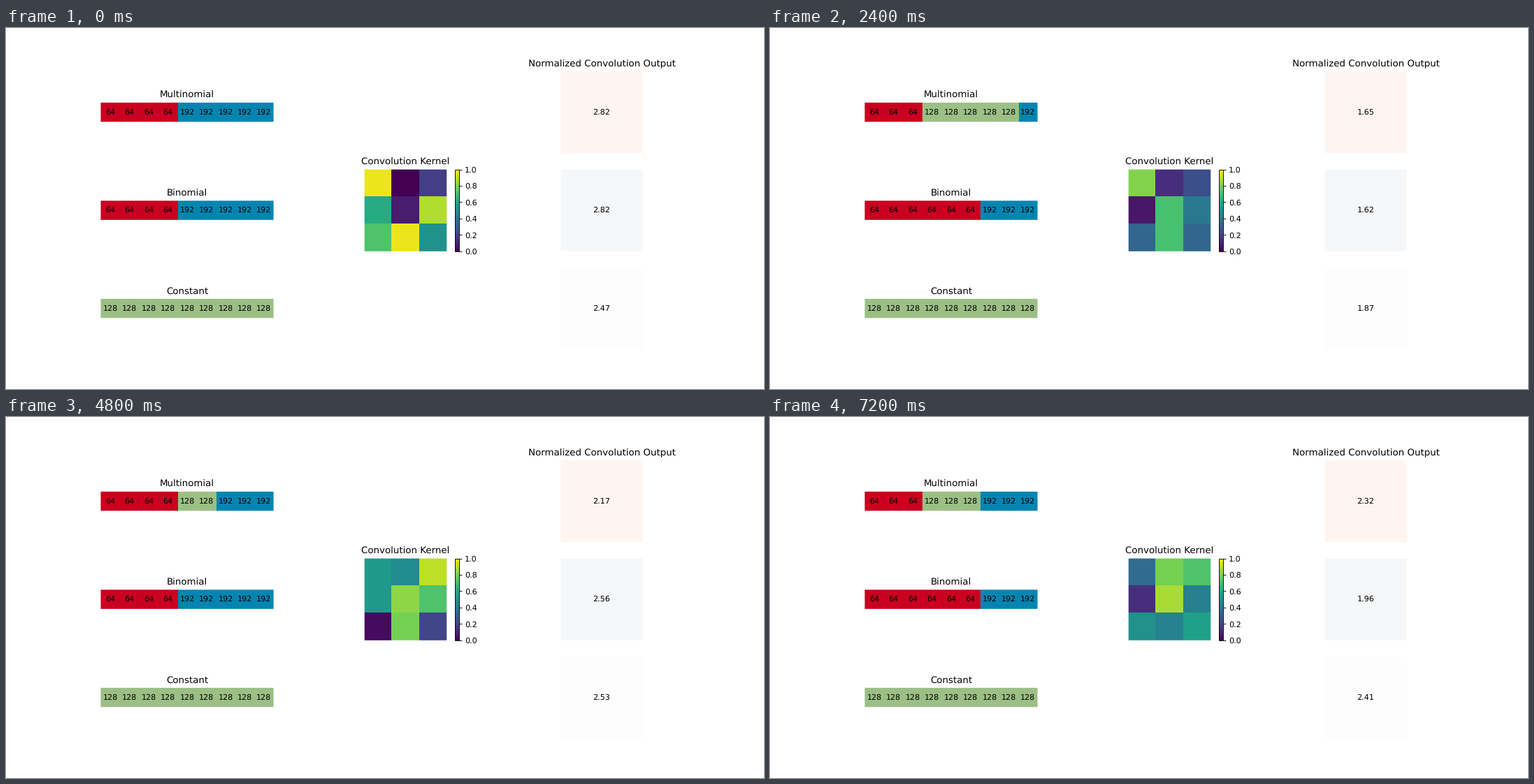
Write a matplotlib script that moves like this. It is 1084 px wide and 517 px high and loops after 8 s.

```python
import matplotlib.pyplot as plt
import numpy as np
from matplotlib.animation import FuncAnimation
from matplotlib.cm import ScalarMappable
from matplotlib.patches import Rectangle

W, H, DPI = 1084, 517, 80
INTERVAL, STEPS_PER_SAMPLE, N_FRAMES = 400, 3, 20
COLORS = {64: "#ca0020", 128: "#9bbf85", 192: "#0485b1"}

# Default 3 x 3 subplot grid
LEFT, TOP = 0.125 * W, 0.12 * H
COL_W, ROW_H = 0.775 * W / 3.4, 0.77 * H / 3.4
CENTERS_Y = TOP + ROW_H * (0.5 + 1.2 * np.arange(3))
CELL = COL_W / 9
KERNEL_X = (512.7, 551, 591, 630.2)
KERNEL_Y = (202.6, 241, 280, 319.8)
OUT_X = 852

# Random draws: where 64 ends and 192 starts in each bar, and the kernel in percent
SAMPLES = [
    ((4, 4), (4, 4), (97, 0, 18, 61, 8, 88, 72, 97, 51)),
    ((4, 7), (4, 4), (72, 81, 22, 98, 16, 28, 16, 35, 50)),
    ((3, 8), (6, 6), (81, 13, 24, 6, 71, 40, 33, 71, 33)),
    ((5, 7), (7, 7), (91, 4, 33, 9, 47, 82, 29, 15, 34)),
    ((4, 6), (4, 4), (54, 48, 90, 54, 83, 72, 3, 79, 21)),
    ((4, 6), (5, 5), (44, 36, 92, 72, 72, 28, 57, 79, 80)),
    ((3, 6), (6, 6), (35, 79, 72, 13, 87, 43, 50, 44, 57)),
]
CONSTANT = (0, 9)

plt.rcParams.update({"font.family": "DejaVu Sans", "text.hinting": "none"})
fig = plt.figure(figsize=(W / DPI, H / DPI), dpi=DPI, facecolor="white")
ax = fig.add_axes([0, 0, 1, 1])
ax.set(xlim=(0, W), ylim=(H, 0))
ax.axis("off")


def box(x0, x1, cy, height, color="white"):
    return ax.add_patch(Rectangle((x0, cy - height / 2), x1 - x0, height,
                                  fc=color, lw=0, snap=False))


def label(x, y):
    return ax.text(x, y, "", size=10, ha="center", va="center")


def title(x, top, text):
    ax.text(x, top - 6.67, text, size=12, ha="center", va="baseline")


def pixel_values(cuts):
    """Nine sorted values: 64 before the first cut, 192 from the second on."""
    return 64 * (1 + sum(np.arange(9) >= cut for cut in cuts))


class Row:
    """A bar of nine values and the panel with its convolution result."""

    def __init__(self, name, cy, tint):
        edges = LEFT + CELL * np.arange(10)
        centers = edges[:-1] + CELL / 2
        edges[1:-1] = np.round(edges[1:-1] + 0.4)  # whole pixels: no seams
        title(centers[4], cy - CELL / 2, name)
        self.cells = [box(a, b, cy, CELL) for a, b in zip(edges, edges[1:])]
        self.labels = [label(x, cy) for x in centers]
        box(OUT_X - ROW_H / 2, OUT_X + ROW_H / 2, cy, ROW_H, tint)
        self.result = label(OUT_X, cy)

    def set(self, values, weights):
        for cell, text, value in zip(self.cells, self.labels, values):
            cell.set_facecolor(COLORS[value])
            text.set_text(str(value))
        self.result.set_text(f"{values @ weights / 255:.2f}")


rows = [Row(*spec) for spec in zip(("Multinomial", "Binomial", "Constant"),
                                   CENTERS_Y,
                                   ("#fff5f0", "#f6f7f8", "#fdfdfd"))]

title(571.5, CENTERS_Y[1] - ROW_H / 2, "Convolution Kernel")
title(OUT_X, TOP, "Normalized Convolution Output")
kernel = ax.pcolormesh(KERNEL_X, KERNEL_Y, np.zeros((3, 3)), cmap="viridis",
                       vmin=0, vmax=1, antialiased=True, snap=False)
cax = fig.add_axes([642.3 / W, 1 - (CENTERS_Y[1] + ROW_H / 2) / H,
                    ROW_H / 20 / W, ROW_H / H])
fig.colorbar(ScalarMappable(cmap="viridis"), cax=cax)


def update(frame):
    multi, binary, percent = SAMPLES[frame // STEPS_PER_SAMPLE]
    weights = np.array(percent) / 100
    kernel.set_array(weights.reshape(3, 3))
    for row, cuts in zip(rows, (multi, binary, CONSTANT)):
        row.set(pixel_values(cuts), weights)
    return []


anim = FuncAnimation(fig, update, frames=N_FRAMES, interval=INTERVAL,
                     repeat=True, repeat_delay=0, blit=False)
plt.show()
```
